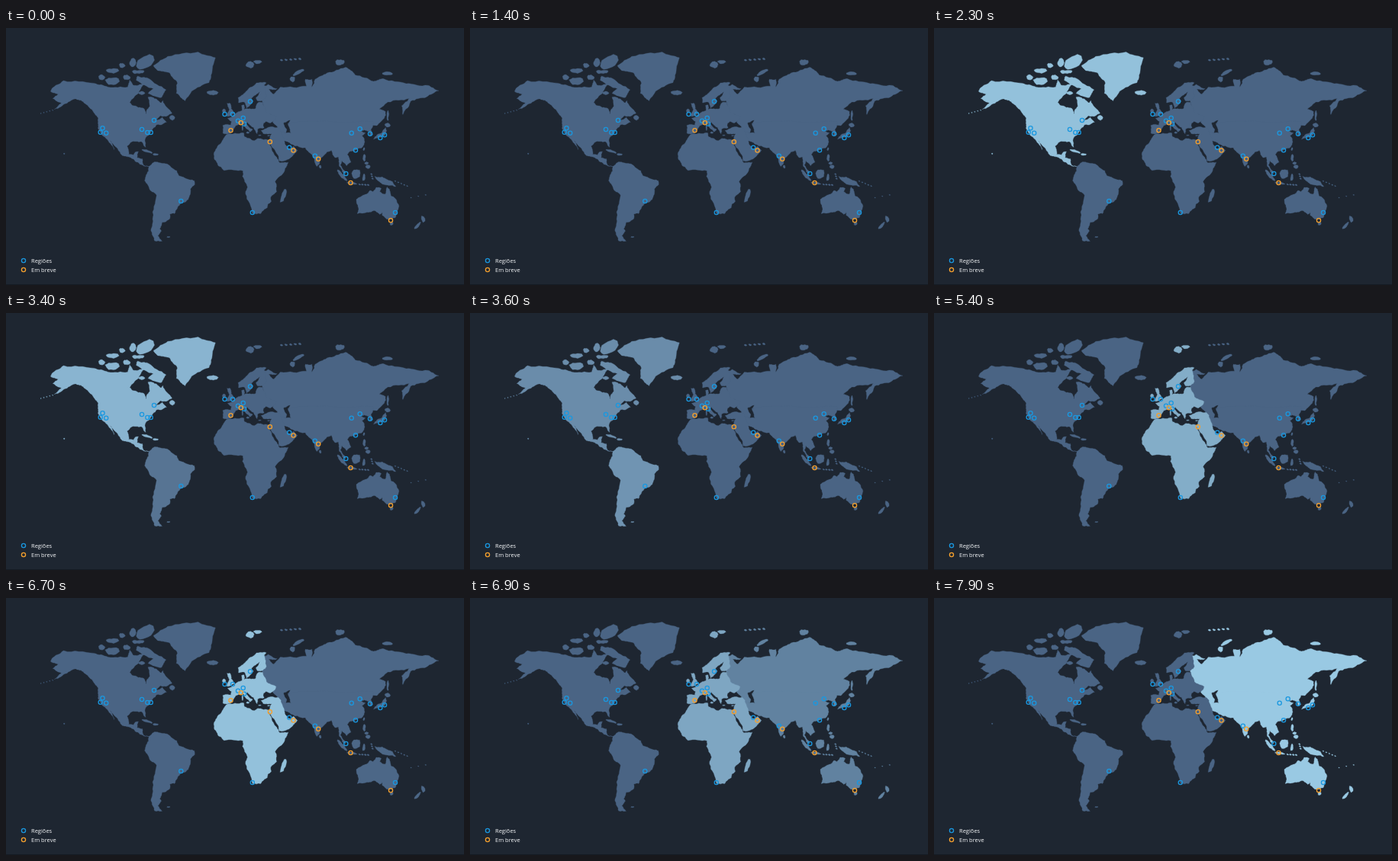
These frames come from a looping animation (600 by 337 pixels, 8000 ms). An HTML page:

```html
<!DOCTYPE html>
<html lang="pt">
<head>
<meta charset="utf-8">
<title>Mapa de regiões</title>
<style>
  html, body { margin: 0; width: 100%; height: 100%; overflow: hidden; background: #1e2631; }
  svg { display: block; width: 100vw; height: 100vh; }
  .region { stroke-width: .35; stroke-linejoin: round; }
  .ring { fill: none; stroke-width: 1.3; }
  text { font: 500 7.5px "Open Sans", "Noto Sans", sans-serif; fill: #f4f6f8; }
</style>
</head>
<body>
<svg id="stage" viewBox="0 0 600 337"></svg>
<script>
const LOOP = 8000;
const LAND = [74, 100, 132], LIGHT = [153, 201, 227];
const stage = document.getElementById('stage');

let seed = 7;
function random() {
  seed = (seed * 16807) % 2147483647;
  return seed / 2147483647;
}

function add(parent, tag, attrs = {}) {
  const el = document.createElementNS('http://www.w3.org/2000/svg', tag);
  for (const k in attrs) el.setAttribute(k, attrs[k]);
  return parent.appendChild(el);
}

// Miller cylindrical projection
function project([lon, lat]) {
  const y = 1.25 * Math.log(Math.tan(Math.PI / 4 + 0.4 * lat * Math.PI / 180));
  return [297 + 1.42 * lon, 193 - 81.4 * y];
}

// Breaks each edge in two with a small sideways shift, for a ragged coast.
function roughen(points) {
  return points.flatMap((a, i) => {
    const b = points[(i + 1) % points.length];
    const dx = b[0] - a[0], dy = b[1] - a[1], len = Math.hypot(dx, dy) || 1;
    const shift = (random() - .5) * Math.min(.24, 2.2 / len);
    return [a, [a[0] + dx / 2 - dy * shift, a[1] + dy / 2 + dx * shift]];
  });
}

function draw(region, points, rounds) {
  for (let i = 0; i < rounds; i++) points = roughen(points);
  const d = points.map(p => p[0].toFixed(1) + ' ' + p[1].toFixed(1)).join('L');
  add(region, 'path', { d: 'M' + d + 'Z' });
}

// Outline given as corners "lon lat, lon lat"
function land(region, coast) {
  draw(region, coast.split(',').map(p => project(p.trim().split(' ').map(Number))), 3);
}

// Oval island: centre in degrees, radii in pixels, tilt in degrees
function isle(region, lon, lat, rx, ry, tilt = 0) {
  const [x, y] = project([lon, lat]), t = tilt * Math.PI / 180, points = [];
  for (let i = 0; i < 9; i++) {
    const a = i * Math.PI * 2 / 9, r = .85 + .35 * random();
    const u = rx * r * Math.cos(a), v = ry * r * Math.sin(a);
    points.push([x + u * Math.cos(t) - v * Math.sin(t), y + u * Math.sin(t) + v * Math.cos(t)]);
  }
  draw(region, points, 1);
}

function chain(region, from, to, count, size) {
  for (let i = 0; i < count; i++) {
    const k = i / (count - 1);
    isle(region, from[0] + (to[0] - from[0]) * k, from[1] + (to[1] - from[1]) * k, size, size * .6, 20);
  }
}

const [northAmerica, southAmerica, asia, emea] =
  Array.from({ length: 4 }, () => add(stage, 'g', { class: 'region' }));

land(northAmerica, '-168 65.6,-163 69,-156 71.3,-128 70,-115 68,-97 68,-95 71.8,-92 69,-82 69.5,-86 66,-87 64.6,-95 59,-92 57,-82 55.2,-80 51.3,-79 54.5,-76.5 56.5,-78 62.3,-70 61,-66 58.8,-64.5 60.2,-56 52,-60 50.2,-66.5 50.2,-71 47,-65 49,-61 45.5,-66 43.5,-70 43.7,-76 37,-81 31.5,-80.3 25.3,-84 30,-94 29.5,-97.5 26,-96 19,-91.5 18.5,-90 21,-87 21.5,-88.2 16,-83.3 15,-82.5 9.5,-77.5 8,-85.7 10,-94 16,-102 18,-105.5 22.5,-113 31,-109.5 23.2,-117 32.7,-124.3 41,-124 48.5,-130 54.5,-138 59.5,-147 61,-153 58.5,-164.5 54.6,-158 58.5,-166 61.5,-161 64');
land(northAmerica, '-44 60,-52 64.5,-51 70,-58 75,-68 76,-73 78.3,-60 82,-32 83.6,-16 81.5,-20 74,-22 70.3,-38 65.6');
land(northAmerica, '-61.5 66.5,-66 62,-78 64.5,-73 67,-89 71.5,-88 73.5,-78 72.5');
isle(northAmerica, -111, 71, 9, 4.5);
isle(northAmerica, -121, 73, 4, 3.5);
isle(northAmerica, -80, 79.9, 13, 8, -38);
isle(northAmerica, -92, 79.5, 4, 5);
isle(northAmerica, -87, 75.5, 8, 2.5);
isle(northAmerica, -98, 73, 5, 3);
isle(northAmerica, -111, 76, 8, 3);
isle(northAmerica, -102, 78.3, 4, 3);
isle(northAmerica, -84, 64.8, 4, 2.2);
isle(northAmerica, -56, 48.8, 3.4, 3.2);
isle(northAmerica, -18.7, 64.9, 6.5, 3);
isle(northAmerica, -79, 21.7, 7, 1.2, 17);
isle(northAmerica, -71, 18.9, 3.6, 1.3);
isle(northAmerica, -155.5, 19.6, .8, .8);
chain(northAmerica, [-166, 54], [-177, 51.8], 5, .7);

land(southAmerica, '-77.5 8,-72 12.2,-62 10.6,-51.5 4,-50 0,-44 -2.6,-35.3 -5.3,-35 -8.5,-39 -13,-41 -22,-48.5 -26,-53.5 -34,-58 -34.5,-58 -38.2,-65 -41,-67.5 -46,-65.8 -47.5,-69 -51,-65.2 -54.7,-72 -54.5,-75.5 -47,-73.7 -37.5,-70.2 -18.4,-76 -14,-81.3 -5,-80 0,-77.5 4');
isle(southAmerica, -59.3, -51.8, 2.2, .7);

// Western borders of Asia run a little under the neighbouring region.
land(asia, '27 60,28 68.5,33 69.4,41 67,33 66.7,38 64,44 68,68 68.5,67 72,73 72,73 68,76 72,87 75,104 77.6,113 74,130 71,139 72.3,160 69.8,180 68.9,190 66,179 62.5,164 59.8,162 56,157 51,156 57,163 61.5,143 59.3,135.3 54.7,141 53,140 48.5,133 43,60 43,51 44.5,53 47,47 45,49.5 40.5,49 37,43 38,41 42.5,37 45.5,38 49.5,29 53');
land(asia, '60 46,130 46,127.5 39.8,129.3 36,126.5 34.5,126 38,121.5 39.5,118 39,122.5 37.2,119.3 35,121.8 30,118.5 24.5,108 21.6,105.8 19,109 12,105 8.7,100.5 13.4,99.3 9.5,103.4 4,104 1.4,101.3 2.8,98.3 8.3,97.5 16.8,94.5 16,91 22.5,87 21.2,80.2 15,80 10.4,77.6 8.1,72.8 19,70 21,67 24.8,57 26.5,50.5 30,46.5 31,43 38,49 37.2,53.8 37,51 44.5');
land(asia, '114 -22,115.7 -32,115 -34.2,124 -33,131 -31.6,135.8 -34.8,138 -33,138 -35.6,143.5 -38.8,150 -37.4,153.4 -28,149 -20.3,146 -18.8,145.3 -15,142.5 -10.8,140.8 -17.5,135.5 -15,137 -12.2,132.5 -11.2,129.5 -15,126.8 -14,122.5 -17.5');
land(asia, '131 -1,138 -1.6,147.5 -6,150.5 -10.5,138 -8.3');
land(asia, '130 32,131 34,137 37,141 41.5,142 39,140.5 35.5,135 33.6');
isle(asia, 55, 72, 3.5, 3.5);
isle(asia, 61, 75.4, 8, 2.3, -30);
isle(asia, 99, 79.6, 6, 3.5);
isle(asia, 143, 74.8, 7, 1.8);
isle(asia, 143, 50, 1.2, 7);
isle(asia, 143, 43.3, 3.5, 2.8);
isle(asia, 121, 23.7, 1, 2.3, 15);
isle(asia, 80.7, 7.8, 1.4, 2.3);
isle(asia, 121.3, 16, 1.8, 4.5);
isle(asia, 124.8, 7.8, 2.8, 2.4);
isle(asia, 123.3, 11, 2.4, 1.6);
isle(asia, 100.8, -.3, 10, 2.2, 48);
isle(asia, 109.8, -7.3, 6.5, 1.1, 8);
isle(asia, 113.8, 1, 5, 7, 35);
isle(asia, 121, -2, 1.7, 4.6, 10);
isle(asia, 146.5, -42, 2.2, 2.1);
isle(asia, 175.7, -38.4, 2.1, 4.3, -15);
isle(asia, 170.3, -43.8, 1.8, 5.6, 42);
chain(asia, [45, 80.5], [62, 81], 5, 1.8);
chain(asia, [117, -8.5], [125, -9], 4, 1.4);
chain(asia, [128, 1], [129, -3.2], 3, 1.2);
chain(asia, [150, -5.5], [161, -10], 5, 1);
chain(asia, [164.5, -20.5], [178, -18], 3, .8);

land(emea, '-6 35.8,10 37.3,11 34,20 30.8,23 32.7,34.2 31.3,32.6 29.8,37.3 20.8,43.2 11.5,51.2 11.8,48 4.5,39 -6,40.5 -15,35 -20,35.5 -24,32.8 -25.8,32 -29,26 -34,18.4 -34.2,11.8 -17,13.7 -11,9 -1,9.5 4,-8 4.4,-13 8.5,-17 14.7,-17 21,-10 30');
land(emea, '26.2 39,35 42,41.5 41.5,44.5 39,46 35,47.8 30,51 24.6,54 24.2,56.3 26,59.7 22.4,55 17.2,45 12.8,43 13,42.5 16.5,35 28,34.2 27.8,32.5 31,34.2 31.3,36 36.5,28 36.7');
land(emea, '5 62,5.5 58.8,10.5 59.3,12.8 55.5,17 58,19 60,17.3 61.7,25 65.5,21.5 62,23 60,28 60.5,31 62.8,29 69,31 70.2,22 70.2,13 66');
land(emea, '27.5 59.3,31 53,40 49.5,38.5 47,35 45,30.5 46,28 43.5,29 41.2,23 40.3,22.5 36.5,19.3 41.5,13.5 45.6,12.4 44.2,18.4 40,16 38,10 44,3 43,-.3 39,-2 36.8,-9 37,-9 43.2,-1.6 43.4,-1.2 46,-4.7 48.3,1.6 50.8,8.5 53.7,8.2 57,10.5 57.5,10.5 54.3,21 55,22 57.5,23.5 59');
land(emea, '-5.5 50,1.5 51.5,-1.5 55,-2.5 58.5,-5.2 58.5,-3.2 54.8,-4.6 52');
isle(emea, -8, 53.4, 2.5, 2.6);
isle(emea, 16, 78.7, 5, 4.2);
isle(emea, 23, 79.8, 5, 2);
isle(emea, 14, 37.5, 2, 1);
isle(emea, 9, 41, .8, 3);
isle(emea, 25, 35.2, 1.9, .5);
isle(emea, 33.2, 35, 1.4, .6);
isle(emea, 46.7, -19, 2.8, 9.5, 18);

function mix(k) {
  return `rgb(${LAND.map((c, i) => Math.round(c + (LIGHT[i] - c) * k))})`;
}

// Steps are [time, value]; the ends are held.
function play(el, steps, style) {
  const frames = [[0, steps[0][1]], ...steps, [LOOP, steps[steps.length - 1][1]]]
    .map(([t, v]) => ({ offset: t / LOOP, ...style(v) }));
  el.animate(frames, { duration: LOOP, iterations: Infinity });
}

function glow(region, steps) {
  play(region, steps, k => ({ fill: mix(k), stroke: mix(k) }));
}
glow(northAmerica, [[2100, 0], [2300, .92], [2800, 1], [3300, 1], [3600, .4], [4200, 0]]);
glow(southAmerica, [[3300, 0], [3600, .48], [4200, 1], [4800, 1], [4900, .96], [5400, 0]]);
glow(emea, [[4800, 0], [5400, .72], [6000, 1], [6500, 1], [6700, .92], [7400, 0]]);
glow(asia, [[6500, 0], [6700, .03], [7400, .95], [7900, 1]]);

const marks = add(stage, 'g');
function rings(color, list) {
  for (const pair of list.split(' ')) {
    const [cx, cy] = pair.split(',');
    add(marks, 'circle', { class: 'ring', cx, cy, r: 2.6, stroke: color });
  }
}
rings('#1a98e0', '194,121 126.5,131.3 123.7,136.7 131.2,137.7 178,133 185.3,137 189.7,137 229.3,227 320,96.3 286.5,113 297,113 304,121.7 310.7,118 312,125.7 322.8,242 371.2,156.7 404.8,167.7 452.7,137.7 463.7,132.3 477,138.7 490.3,144 496,140.3 458,160.3 445.3,191 510,242 23,305');
rings('#f6a12e', '294.5,134.3 307.8,124.3 345.8,149.3 376.5,160.5 409.2,171.8 451.5,203 504,252.2 23,317');
add(marks, 'text', { x: 33, y: 307.7 }).textContent = 'Regiões';
add(marks, 'text', { x: 33, y: 319.8 }).textContent = 'Em breve';
play(marks, [[200, 1], [200, 0], [500, .45], [800, .78], [1100, .94], [1500, 1]], v => ({ opacity: v }));

add(stage, 'rect', { x: 0, y: 336, width: 600, height: 1, fill: '#151b24' });
</script>
</body>
</html>
```
